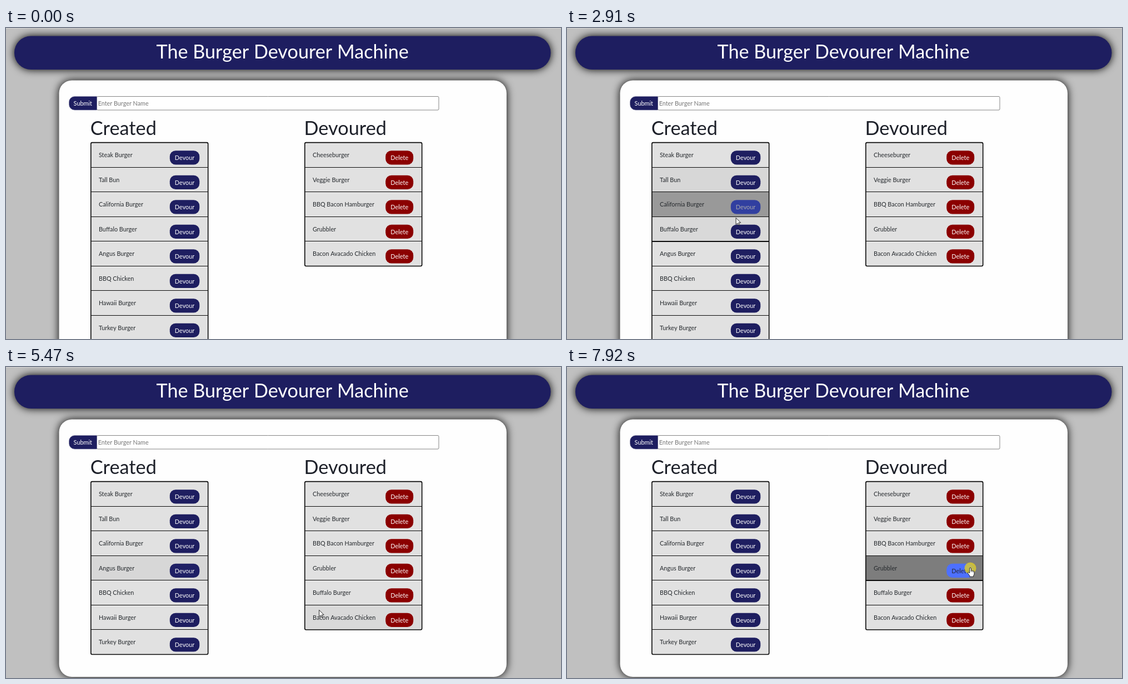
An HTML page with a canvas for the animation above (7990 ms loop, 999 by 561 pixels).

```html
<!DOCTYPE html>
<html lang="en">
<head>
<meta charset="utf-8">
<title>The Burger Devourer Machine</title>
<style>
html, body { margin: 0; width: 100%; height: 100%; overflow: hidden; background: #c0c0c0; }
canvas { display: block; }
</style>
</head>
<body>
<canvas id="stage" width="999" height="561"></canvas>
<script>
const ctx = document.getElementById('stage').getContext('2d');
const LOOP = 7990, TICK = 77.8, FIRST = 338, RELOAD = 4320;
const LATO = 'Lato, "Open Sans", sans-serif';
const NAVY = [30, 30, 96], RED = [139, 0, 0], BLUE = [77, 112, 255];
const WHITE = [255, 255, 255], INK = [38, 38, 50], ROW = [225, 225, 225], ROW_HOVER = [125, 125, 125];
const TOP = 207, PITCH = 44.5;

const created = ['Steak Burger', 'Tall Bun', 'California Burger', 'Buffalo Burger',
  'Angus Burger', 'BBQ Chicken', 'Hawaii Burger', 'Turkey Burger'];
const devoured = ['Cheeseburger', 'Veggie Burger', 'BBQ Bacon Hamburger', 'Grubbler', 'Bacon Avacado Chicken'];
const moved = 'Buffalo Burger';
const createdAfter = created.filter(n => n !== moved);
const devouredAfter = [...devoured.slice(0, 4), moved, devoured[4]];

// Pointer: time, x, y
const path = [
  [338, 880, 520], [730, 640, 400], [1116, 441, 309], [1355, 441, 309], [1420, 437.5, 300],
  [1750, 415, 290], [2100, 355, 264], [2210, 330, 222], [2290, 315, 228], [2420, 292, 252],
  [2516, 283.5, 277], [2620, 290, 297], [2700, 300, 312], [2860, 304, 341], [3320, 305, 356],
  [3500, 308, 371], [4930, 308, 371], [5010, 330, 378], [5130, 370, 392], [5350, 540, 432],
  [5500, 618, 453], [5720, 618, 455], [5970, 590, 429], [6170, 577.5, 410], [6500, 600, 407],
  [6760, 650, 385], [7060, 684, 370], [7280, 726, 362], [LOOP, 726, 362]
];

// Hovers: key, enter, leave (L/R list, lower case for its button)
const hovers = [
  ['L1', 2100, 2230], ['L0', 2230, 2420], ['L1', 2420, 2620], ['L2', 2620, 2860],
  ['l2', 2700, 2840], ['L3', 2860, RELOAD], ['l3', 3320, RELOAD],
  ['L3', 4935, 5120], ['l3', 4935, 5060],
  ['R5', 5350, 5970], ['R4', 5970, 6760], ['R3', 6760, LOOP], ['r3', 7060, LOOP]
];
const clicks = [[3910, 4080], [7880, LOOP]];

const clamp = v => Math.max(0, Math.min(1, v));
const rgb = c => `rgb(${c.map(Math.round).join(',')})`;
const mix = (a, b, k) => rgb(a.map((v, i) => v + (b[i] - v) * k));

// The CSS "ease" curve
function ease(x) {
  if (x <= 0) return 0;
  if (x >= 1) return 1;
  const bez = (p, q, u) => 3 * p * u * (1 - u) ** 2 + 3 * q * u * u * (1 - u) + u ** 3;
  let lo = 0, hi = 1;
  for (let i = 0; i < 24; i++) {
    const mid = (lo + hi) / 2;
    if (bez(0.25, 0.25, mid) < x) lo = mid; else hi = mid;
  }
  return bez(0.1, 1, lo);
}

function fade(key, t) {
  let v = 0;
  const run = (from, to, target) => {
    if (t > from) v += (target - v) * ease((Math.min(t, to) - from) / 500);
  };
  const list = hovers.filter(h => h[0] === key && (h[1] >= RELOAD) === (t >= RELOAD));
  list.forEach(([, on, off], i) => {
    run(on, off, 1);
    run(off, list[i + 1] ? list[i + 1][1] : LOOP, 0);
  });
  return v;
}

const isOver = (key, t) => hovers.some(h => h[0] === key && t >= h[1] && t < h[2]);

function pointer(t) {
  const i = Math.max(1, path.findIndex(p => p[0] >= t));
  const [a, b] = [path[i - 1], path[i]];
  const k = clamp((t - a[0]) / (b[0] - a[0]));
  return [a[1] + (b[1] - a[1]) * k, a[2] + (b[2] - a[2]) * k];
}

function text(str, x, y, size, color, align = 'left', family = LATO) {
  ctx.font = `${size}px ${family}`;
  ctx.textAlign = align;
  ctx.fillStyle = color;
  ctx.fillText(str, x, y);
}

function box(x, y, w, h, r, fill) {
  ctx.beginPath();
  ctx.roundRect(x, y, w, h, r);
  if (fill) { ctx.fillStyle = fill; ctx.fill(); }
}

function shadowBox(x, y, w, h, r, fill) {
  ctx.save();
  ctx.shadowColor = '#000';
  ctx.shadowBlur = 15;
  box(x, y, w, h, r, fill);
  ctx.restore();
}

function drawPage(rows) {
  ctx.fillStyle = '#c0c0c0';
  ctx.fillRect(0, 0, 999, 561);
  ctx.fillStyle = '#d6d6d6';
  ctx.fillRect(0, 0, 999, 1);
  shadowBox(15, 14.5, 965.5, 60.5, 30, rgb(NAVY));
  text('The Burger Devourer Machine', 497.7, 55, 34.2, '#fff', 'center');
  shadowBox(95.5, 94.5, 805.5, TOP + rows * PITCH + 40.5 - 94.5, 23, '#fefefe');

  box(163.5, 123.5, 615.5, 24.5, 2, '#fff');
  ctx.strokeStyle = '#858585';
  ctx.lineWidth = 1;
  ctx.stroke();
  box(113.5, 123.5, 50, 24.5, [10, 0, 0, 10], rgb(NAVY));
  ctx.strokeStyle = '#77779a';
  ctx.lineWidth = 0.6;
  ctx.stroke();
  text('Submit', 138.3, 140, 10.9, '#fff', 'center');
  text('Enter Burger Name', 165.7, 140, 10.8, '#757575');
  text('Created', 151.8, 193, 34.3, '#1d2029');
  text('Devoured', 536.5, 193, 34.3, '#1d2029');
}

function drawList(names, x, side, btn, t) {
  const h = names.length * PITCH, w = 210.5;
  names.forEach((name, i) => {
    const y = TOP + i * PITCH;
    ctx.fillStyle = mix(ROW, ROW_HOVER, fade(side + i, t));
    ctx.fillRect(x, y, w, PITCH);
  });
  names.forEach((name, i) => {
    const y = TOP + i * PITCH;
    if (i < names.length - 1) {
      ctx.fillStyle = '#0a0a0a';
      ctx.fillRect(x, Math.round(y + PITCH - 0.7), w, isOver(side + i, t) ? 2 : 1);
    }
    text(name, x + 14, y + 26.3, 10.8, '#25292d');
    const k = fade(side.toLowerCase() + i, t);
    box(x + btn.x, y + 14.2, btn.w, 25.4, 10.5, mix(btn.color, BLUE, k));
    text(btn.label, x + btn.x + btn.w / 2, y + 31, 10.9, mix(WHITE, INK, k), 'center');
  });
  box(x - 0.2, TOP - 0.4, w + 0.4, h + 0.4, 2.5);
  ctx.strokeStyle = '#080808';
  ctx.lineWidth = 1.6;
  ctx.stroke();
}

function drawStatus(t) {
  const a = Math.min(clamp((t - 4060) / 120), 1 - clamp((t - 4780) / 140));
  if (a <= 0) return;
  ctx.globalAlpha = a;
  box(-4, 549.5, 337, 16, [0, 3, 0, 0], '#d3d5d7');
  text('Waiting for burger-devourer-machine.herokuapp.com...', 0, 561, 8, '#4c5054', 'left',
    '"Open Sans", "Noto Sans", sans-serif');
  ctx.globalAlpha = 1;
}

const arrow = new Path2D('M0 0V12L2.8 9.5L4.7 13.6L6.5 12.8L4.7 8.8H8.6Z');
const hand = new Path2D('M-1.3 .8Q0 -.8 1.3 .8V5.2Q2.6 4.4 3.4 5.6Q4.8 4.9 5.4 6.2' +
  'Q7 5.8 7 7.6V11Q7 13 5.7 14.2V16.2H-1.2V14.4L-4.4 10.2Q-5 8.4 -3.4 8.2L-1.3 9.8Z');

function drawPointer(t) {
  const [x, y] = pointer(t);
  if (clicks.some(c => t >= c[0] && t < c[1])) {
    ctx.beginPath();
    ctx.arc(x, y + 1, 10.5, 0, Math.PI * 2);
    ctx.fillStyle = 'rgba(222,205,40,.8)';
    ctx.fill();
  }
  ctx.save();
  ctx.translate(x, y);
  const onButton = isOver('l2', t) || isOver('r3', t) || (t >= 3320 && t < 5060);
  const onText = t >= 6080 && t < 6650 && x < 621;
  if (onText) {
    ctx.strokeStyle = '#5c5e5e';
    ctx.lineWidth = 1;
    ctx.beginPath();
    ctx.moveTo(-2.5, -5.5); ctx.lineTo(2.5, -5.5);
    ctx.moveTo(0, -5.5); ctx.lineTo(0, 5.5);
    ctx.moveTo(-2.5, 5.5); ctx.lineTo(2.5, 5.5);
    ctx.stroke();
  } else {
    const shape = onButton ? hand : arrow;
    ctx.fillStyle = '#fff';
    ctx.strokeStyle = '#111';
    ctx.lineWidth = 0.9;
    ctx.lineJoin = 'round';
    ctx.fill(shape);
    ctx.stroke(shape);
    if (onButton) {
      ctx.lineWidth = 0.6;
      ctx.stroke(new Path2D('M1.3 5V8M3.4 5.8V8.2M5.4 6.4V8.4'));
    }
  }
  ctx.restore();
}

function draw(now) {
  const ms = now % LOOP;
  const t = FIRST + Math.floor((ms - FIRST) / TICK) * TICK + 0.5;
  const after = t >= RELOAD;
  const left = after ? createdAfter : created;
  drawPage(left.length);
  drawList(left, 153, 'L', { x: 141.8, w: 53.5, color: NAVY, label: 'Devour' }, t);
  drawList(after ? devouredAfter : devoured, 538, 'R', { x: 145.2, w: 50, color: RED, label: 'Delete' }, t);
  drawStatus(t);
  if (t >= FIRST) drawPointer(t);
}

const start = performance.now();
function loop() {
  draw(performance.now() - start);
  requestAnimationFrame(loop);
}
loop();
</script>
</body>
</html>
```
